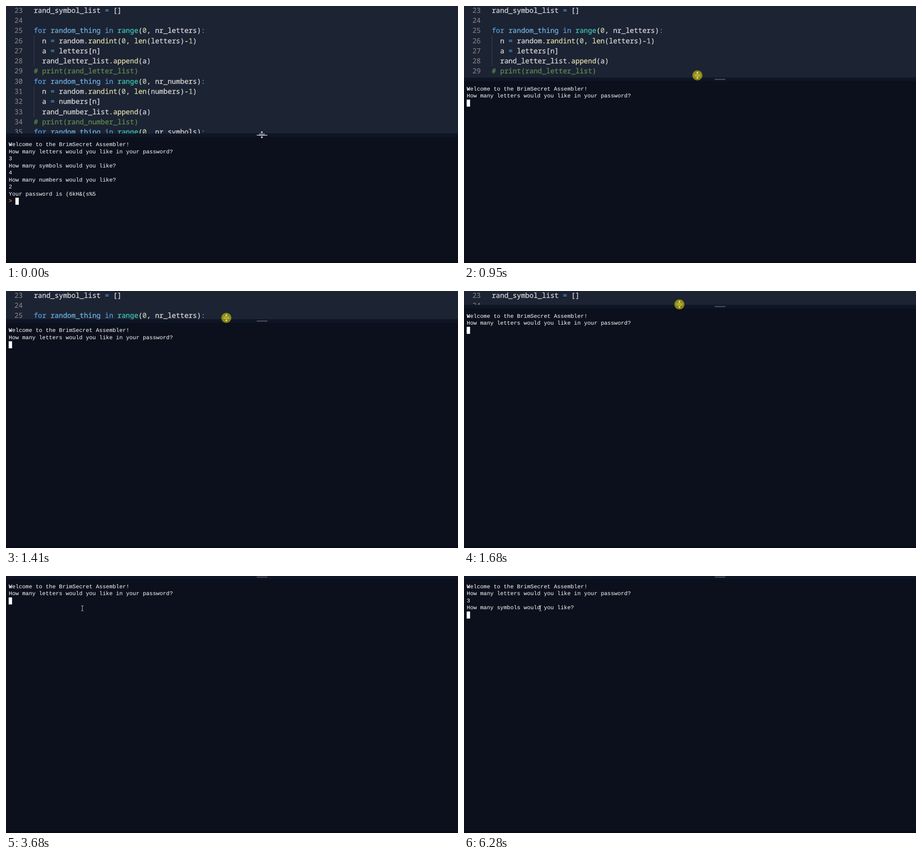
Recreate the animation shown at these times as an HTML page. Size 992 by 565 pixels, loop 8000 ms.

```html
<!DOCTYPE html>
<html lang="en">
<head>
<meta charset="utf-8">
<title>Terminal pane</title>
<style>
  html, body { margin: 0; width: 100%; height: 100%; overflow: hidden; background: #0c0f1c; }
  svg { display: block; width: 100%; height: 100%; }
  text { white-space: pre; text-rendering: geometricPrecision; }
  #code text { font: 15.3px "Noto Sans Mono", "DejaVu Sans Mono", monospace; color: #d8d8d8; }
  #code text, #code tspan { fill: currentColor; stroke: currentColor; stroke-width: .3; }
  #code .no { color: #858585; stroke-width: .1; }
  .key { color: #569cd6; }
  .var { color: #6fb4e2; }
  .type { color: #3dc9b0; }
  .fn { color: #dcdcaa; }
  .num { color: #b5cea8; }
  .note { color: #608b4e; }
  #lines text { font: 12.25px "Liberation Mono", "Courier New", monospace; fill: #fff; }
  #lines .prompt { fill: #e8641b; font-weight: bold; }
</style>
</head>
<body>
<svg viewBox="0 0 992 565">
  <rect width="992" height="565" fill="#1c2333"/>
  <g id="code"></g>
  <g id="pane">
    <rect width="992" height="600" fill="#0c0f1c"/>
    <rect width="992" height="8" fill="#0e1525"/>
    <rect id="grip" x="550" y="2.6" width="24" height="2" rx="1"/>
    <g id="lines"></g>
    <rect id="block" width="7.4" height="15.5" fill="#fff"/>
  </g>
  <rect y="561" width="992" height="4" fill="#080a15"/>
  <g id="mouse" fill="none" stroke="#e8e8e8">
    <g id="resize">
      <path d="M-6.5-1.5h13M-6.5 1.5h13M0-3v-4M0 3v4"/>
      <path d="M-2.8-4.8L0-8L2.8-4.8zM-2.8 4.8L0 8L2.8 4.8z" fill="#e8e8e8" stroke="none"/>
    </g>
    <path id="beam" d="M-2.5-5.5h2L0-5L.5-5.5h2M0-5V5M-2.5 5.5h2L0 5L.5 5.5h2" stroke="#c8cad0"/>
    <circle id="press" r="11" fill="#fff500" fill-opacity=".49" stroke="none"/>
  </g>
</svg>
<script>
const LOOP = 8000, ROW = 22.3, COL = 7.35, LINE = 15.5;
const $ = id => document.getElementById(id);

function add(parent, tag, attrs, text) {
  const el = document.createElementNS("http://www.w3.org/2000/svg", tag);
  for (const k in attrs) el.setAttribute(k, attrs[k]);
  if (text) el.textContent = text;
  return parent.appendChild(el);
}

const pick = name => [
  `for random_thing in range(0, nr_${name}s):`,
  `  n = random.randint(0, len(${name}s)-1)`,
  `  a = ${name}s[n]`,
  `  rand_${name}_list.append(a)`,
  `# print(rand_${name}_list)`
];
const source = ["rand_symbol_list = []", "", ...pick("letter"), ...pick("number"),
  pick("symbol")[0]];

const rules = [
  ["note", /^#.*/],
  ["key", /^(for|in)\b|^[=:]/],
  ["var", /^random_thing\b/],
  ["type", /^range\b/],
  ["fn", /^(randint|len|append)\b/],
  ["num", /^\d+/],
  ["", /^\w+|^\s+|^./]
];

function highlight(el, s) {
  while (s) {
    const [cls, re] = rules.find(r => r[1].test(s));
    const token = s.match(re)[0];
    add(el, "tspan", { class: cls }, token);
    s = s.slice(token.length);
  }
}

source.forEach((s, i) => {
  const y = 14.6 + ROW * i;
  add($("code"), "text", { x: 18.4, y, class: "no" }, String(23 + i));
  highlight(add($("code"), "text", { x: 60.9, y }), s);
  if (s.startsWith("  "))
    add($("code"), "rect", { x: 61, y: y - 16.6, width: 1, height: ROW, fill: "#3a4152" });
});

const ask = (what, rest = "") => `How many ${what} would you like${rest}?`;
const session = [
  "Welcome to the BrimSecret Assembler!", ask("letters", " in your password"), "3",
  ask("symbols"), "4", ask("numbers"), "2", "Your password is (6kH&(s%5", "> "
];

// Lines on screen; the block cursor follows the last one.
function output(t) {
  if (t < 80) return session;
  if (t < 480) return [""];
  if (t < 5140) return [...session.slice(0, 2), ""];
  if (t < 6280) return session.slice(0, 3);
  return [...session.slice(0, 4), ""];
}

const clamp = v => Math.min(1, Math.max(0, v));
const mix = (a, b, f) => a + (b - a) * f;
const steps = (t, from, len) => Math.floor((t - from) / len);

// Drag of the divider: step, pane top, pointer x, pointer y
const drag = [
  [-1, 280.5, 561.5, 283],
  [3, 205.5, 530.5, 202],
  [7, 110, 494, 103],
  [10, 62.5, 483.5, 59],
  [16, -1, 462, 0]
];

function along(keys, k) {
  const i = Math.max(1, keys.findIndex(p => p[0] >= k));
  const a = keys[i - 1], b = keys[i];
  const f = clamp((k - a[0]) / (b[0] - a[0]));
  return a.map((v, j) => mix(v, b[j], f)).slice(1);
}

function pose(t) {
  if (t < 2360) return along(drag, Math.min(16, Math.max(-1, steps(t, 470, 92.5))));
  const k = steps(t, 2530, 93) + 1;
  const out = clamp(k / 4), glide = 1 - (1 - out) ** 2;
  const rise = clamp((k - 5) / 2);
  return [-1, mix(463.5, 167.5, glide), mix(-1, 88, glide) - 17 * rise];
}

function print(lines) {
  $("lines").replaceChildren();
  lines.forEach((s, i) => {
    const el = add($("lines"), "text", { x: 6.1, y: 27.8 + LINE * i });
    if (s[0] === "W") add(el, "tspan", { "font-weight": "bold" }, "W");
    add(el, "tspan", s[0] === ">" ? { class: "prompt" } : {}, s.replace(/^W/, ""));
  });
  const last = lines.length - 1;
  $("block").setAttribute("x", 5.9 + COL * lines[last].length);
  $("block").setAttribute("y", 17 + LINE * last);
}

const show = (id, on) => $(id).setAttribute("visibility", on ? "visible" : "hidden");
const move = (id, x, y) => $(id).setAttribute("transform", `translate(${x} ${y})`);

function draw(t) {
  const [top, x, y] = pose(t);
  const dragging = t >= 480 && t < 2360, clicking = t >= 3280 && t < 3380;
  move("pane", 0, top);
  move("mouse", x, y);
  move("press", clicking ? -2.5 : 0, clicking ? -1 : 0);
  $("grip").setAttribute("fill", t < 480 ? "#a3a5ab" : "#535966");
  show("resize", t < 2360);
  show("beam", t >= 2360 && !(t >= 3380 && t < 3680));
  show("press", dragging || clicking);
  print(output(t));
}

const start = performance.now();
function tick() {
  draw((performance.now() - start) % LOOP);
  requestAnimationFrame(tick);
}
tick();
</script>
</body>
</html>
```
